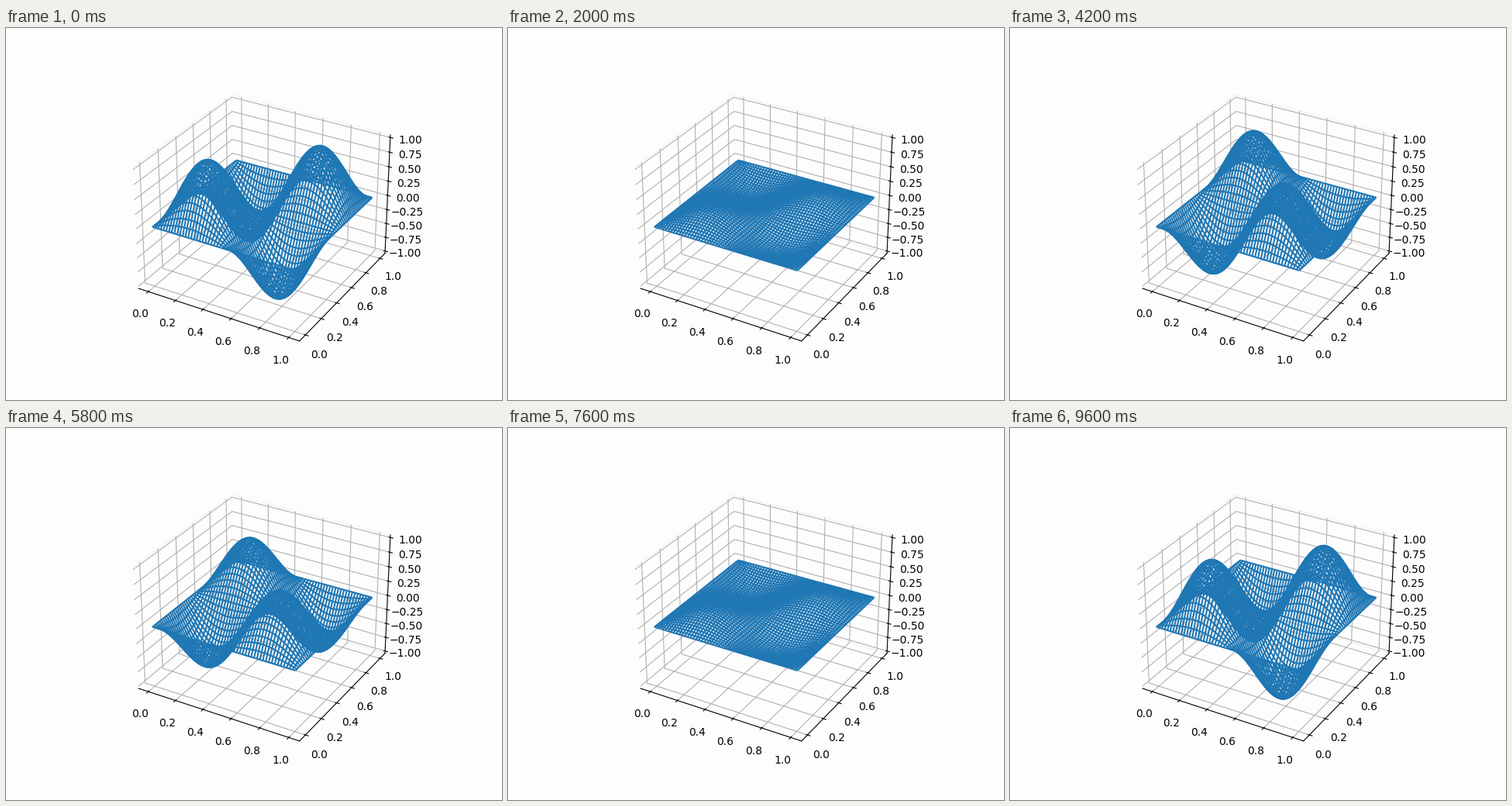
Recreate the animation shown at these times as a matplotlib script. Size 640x480 px, loop 9.8 s.

```python
import numpy as np
import matplotlib.pyplot as plt
from matplotlib.animation import FuncAnimation

FRAMES = 49
INTERVAL = 200
CELLS = 50
PAPER = "#fdfdfd"
PANE_EDGE = "#f4f4f4"

fig = plt.figure(figsize=(6.4, 4.8), dpi=100, facecolor=PAPER)
ax = fig.add_subplot(projection="3d", facecolor=PAPER)


def padded(low, high):
    """Widen a range by the small gap between data limits and panes."""
    pad = (high - low) / 48
    return low - pad, high + pad


ax.set_xlim(*padded(-0.05, 1.05))
ax.set_ylim(*padded(-0.05, 1.05))
ax.set_zlim(*padded(-1, 1))
ax.set_xticks(np.linspace(0, 1, 6))
ax.set_yticks(np.linspace(0, 1, 6))
ax.set_zticks(np.linspace(-1, 1, 9))

for axis in (ax.xaxis, ax.yaxis, ax.zaxis):
    axis.set_pane_color(PAPER)
    axis.pane.set_edgecolor(PANE_EDGE)

side = np.linspace(0, 1, CELLS + 1)
X, Y = np.meshgrid(side, side)
MODE = np.sin(2 * np.pi * X) * np.sin(2 * np.pi * Y)


def mesh_lines(height):
    """Grid lines along x, then along y, as 3D point lists."""
    points = np.stack([X, Y, height], axis=-1)
    return np.concatenate([points, points.swapaxes(0, 1)])


wire = ax.plot_wireframe(X, Y, MODE, rstride=1, cstride=1, color="#1f77b4")


def update(frame):
    # Standing wave, sampled strictly inside one full period
    swing = np.cos(2 * np.pi * (frame + 1) / (FRAMES + 1))
    wire.set_segments(mesh_lines(swing * MODE))
    return (wire,)


anim = FuncAnimation(fig, update, frames=FRAMES, interval=INTERVAL, repeat=True)
plt.show()
```
